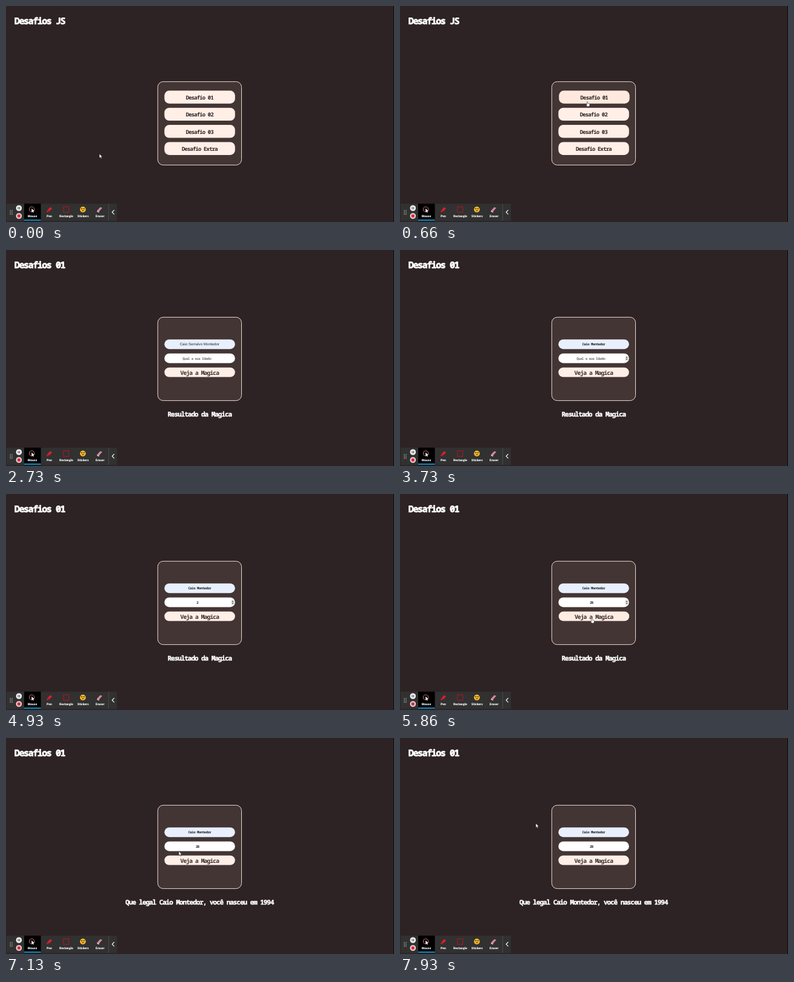
These frames come from a looping animation (640 by 358 pixels, 8 s). An HTML page:

```html
<!DOCTYPE html>
<html lang="pt-BR">
<head>
<meta charset="utf-8">
<title>Desafios JS</title>
<style>
  html, body { margin: 0; width: 100%; height: 100%; overflow: hidden; background: #2d2224; }
  svg { display: block; width: 100%; height: 100%; }
  text { font-family: "Noto Sans Mono", monospace; font-weight: 700; letter-spacing: -.09em; text-rendering: geometricPrecision; stroke-linejoin: round; }
  .mid text { text-anchor: middle; }
  .heading { font-size: 14.8px; font-weight: 900; fill: #fff; stroke: #fff; stroke-width: .8; }
  .result { font-size: 10.9px; font-weight: 800; fill: #fff; stroke: #fff; stroke-width: .4; }
  .card { fill: #433534; stroke: #ecdad4; stroke-width: 1; }
  .menu text { font-size: 8.9px; fill: #2d2224; }
  .action text { font-size: 9.6px; fill: #3a2c2d; }
  .field { font-size: 5.7px; fill: #222; }
  .placeholder { font-weight: 600; fill: #757575; }
  .preview { font: 400 6.2px "Liberation Sans", Arial, sans-serif; letter-spacing: 0; fill: #222; }
  .tools text { font: 900 5px Roboto, sans-serif; letter-spacing: 0; fill: #fff; }
</style>
</head>
<body>
<svg viewBox="0 0 640 358">
  <rect width="640" height="358" fill="#2d2224"/>
  <rect x="639" width="1" height="358" fill="#0c0909"/>
  <text id="heading" class="heading" x="14" y="29.8"></text>

  <g id="menuPage" class="mid">
    <rect class="card" x="250.3" y="125.4" width="138.2" height="138.2" rx="9"/>
  </g>

  <g id="formPage" class="mid">
    <rect class="card" x="250.3" y="111.4" width="138.2" height="138.2" rx="9"/>
    <rect id="nameBox" x="261.3" y="148.2" width="116.5" height="16" rx="8"/>
    <text id="name" x="319.3" y="158.2"></text>
    <rect x="261.3" y="171.4" width="116.5" height="16" rx="8" fill="#fff"/>
    <text id="age" x="315.8" y="181.6"></text>
    <g id="spinner">
      <rect x="371.5" y="175.3" width="5" height="8.4" rx="1" fill="#e6e6e6"/>
      <path d="M372.4 178.8l1.6-2 1.6 2zM372.4 180.6l1.6 2 1.6-2z" fill="#444"/>
    </g>
    <text id="result" class="result" x="319.3" y="275.6"></text>
  </g>

  <g id="tools" class="tools mid">
    <rect x="1" y="327.6" width="182" height="28.8" fill="#313131"/>
    <rect x="30" y="327.6" width="27.5" height="28.8" fill="#000"/>
    <rect x="30" y="354" width="27.5" height="1.7" fill="#17a5ea"/>
    <path d="M7.2 338.2v8M10 338.2v8" stroke="#bbb" stroke-width="1.2" stroke-dasharray="1.2 1"/>
    <circle cx="21.3" cy="335" r="4.8" fill="#f2f2f2"/>
    <path d="M20.1 333v4M22.5 333v4" stroke="#444" stroke-width="1.1"/>
    <circle cx="21.3" cy="348" r="4.8" fill="#ead9db"/>
    <rect x="18.8" y="345.5" width="5" height="5" rx=".8" fill="#d8283a"/>
    <circle cx="42.5" cy="337" r="4.1" fill="none" stroke="#d98086" stroke-width=".9"/>
    <path d="M42.3 335.5v6.5l1.5-1.4 1 2 1-.5-1-2h2z" fill="#fff"/>
    <path d="M67 342l1.2-4 5-4.8 2.8 2.6-5 5z" fill="#d9202c"/>
    <path d="M68.2 338l2.8 2.8" stroke="#7d1018"/>
    <rect x="94.8" y="332.8" width="8.8" height="9.2" fill="none" stroke="#b01424" stroke-width="1.1"/>
    <circle cx="126.8" cy="337.3" r="4.8" fill="#fbc02d"/>
    <path d="M123.6 336h2.6M127.4 336h2.6" stroke="#5b3a12" stroke-width="1.4"/>
    <path d="M124.3 338.6q2.5 3.4 5 0z" fill="#8a3b12"/>
    <path d="M150 339.2l5.4-5.8 3.4 1.2-5.2 6.2z" fill="#d98496"/>
    <path d="M150 339.2l3.6 1.6-.2 1.7-3.2-1.4z" fill="#f0ccd2"/>
    <path d="M169.3 328v28" stroke="#555" stroke-width=".8"/>
    <path d="M178.5 338.2l-3.4 3.6 3.4 3.6" fill="none" stroke="#fff" stroke-width="1.2"/>
  </g>

  <g id="cursor" stroke-linejoin="round">
    <path id="arrow" d="M0 0V7L1.6 5.5 2.8 8.1 4 7.6 2.9 5.1H5z" fill="#fff" stroke="#111" stroke-width=".5"/>
    <path id="hand" d="M-.7 .7Q0-.3.7.7V3.3L3.6 4Q4.2 4.3 4 5.2L3.3 8.6H-.3L-2.2 5.6Q-2.4 4.8-.7 5.6z" fill="#fff" stroke="#222" stroke-width=".5"/>
  </g>
</svg>
<script>
const LOOP = 8000;
const PAGE_SWITCH = 1060;
const PERSON = 'Caio Montedor';
const $ = id => document.getElementById(id);

function add(parent, tag, attrs, content = '') {
  const node = document.createElementNS('http://www.w3.org/2000/svg', tag);
  for (const key in attrs) node.setAttribute(key, attrs[key]);
  node.textContent = content;
  return parent.appendChild(node);
}

function addButton(page, kind, label, y, height, baseline) {
  const group = add(page, 'g', { class: kind });
  const box = add(group, 'rect', { x: 261.3, y, width: 116.5, height, rx: 8 });
  add(group, 'text', { x: 319.3, y: baseline }, label);
  return { group, box };
}

const menu = ['Desafio 01', 'Desafio 02', 'Desafio 03', 'Desafio Extra'].map((label, i) =>
  addButton($('menuPage'), 'menu', label, 140.3 + 28.4 * i, 21.4, 154.8 + 28.4 * i));
const action = addButton($('formPage'), 'action', 'Veja a Magica', 194.7, 15.9, 206.6);

['Mouse', 'Pen', 'Rectangle', 'Stickers', 'Eraser'].forEach((label, i) =>
  add($('tools'), 'text', { x: 43.5 + 27.9 * i, y: 349.5 }, label));

const smooth = (t, from, to) => {
  const k = Math.min(1, Math.max(0, (t - from) / (to - from)));
  return k * k * (3 - 2 * k);
};

// Hovered buttons slide right and turn peach.
function setHover({ group, box }, k) {
  const mix = (a, b) => Math.round(a + (b - a) * k);
  group.setAttribute('transform', `translate(${4.5 * k} 0)`);
  box.setAttribute('fill', `rgb(${mix(255, 244)},${mix(239, 211)},${mix(231, 184)})`);
}

function setText(id, content, className) {
  $(id).textContent = content;
  $(id).setAttribute('class', className);
}

const show = (id, on) => $(id).style.display = on ? '' : 'none';

const path = [ // time, x, y
  [0, 154, 245], [60, 154, 245], [640, 309, 158], [930, 309, 157], [1200, 308.5, 166.5], [1300, 308, 162],
  [5760, 317, 193], [5860, 316.5, 205.5], [6200, 317, 206], [6400, 320, 213.5],
  [6800, 320, 213.5], [7600, 226, 144], [7930, 224, 141.5], [8000, 224, 141.5]
];

function cursorAt(t) {
  const i = path.findIndex(p => p[0] > t);
  const [t0, x0, y0] = path[i - 1], [t1, x1, y1] = path[i];
  const k = smooth(t, t0, t1);
  return [x0 + (x1 - x0) * k, y0 + (y1 - y0) * k];
}

function draw(t) {
  const onForm = t >= PAGE_SWITCH;
  const clicked = t >= 6200;
  show('menuPage', !onForm);
  show('formPage', onForm);
  $('heading').textContent = onForm ? 'Desafios 01' : 'Desafios JS';

  menu.forEach((button, i) => setHover(button, i ? 0 : smooth(t, 580, 860)));
  setHover(action, smooth(t, 5800, 6130) - smooth(t, 6790, 7100));

  $('nameBox').setAttribute('fill', t < 2730 ? '#fff' : '#e8f0fe');
  if (t < 2730) setText('name', 'Digite seu Nome:', 'field placeholder');
  else if (t < 3200) setText('name', 'Caio Serralvo Montedor', 'preview');
  else setText('name', PERSON, 'field');

  if (t < 4930) setText('age', 'Qual a sua Idade:', 'field placeholder');
  else setText('age', t < 5200 ? '2' : '28', 'field');
  show('spinner', t >= 3460 && !clicked);

  $('result').textContent = clicked ? `Que legal ${PERSON}, você nasceu em 1994` : 'Resultado da Magica';

  const pointing = (t >= 560 && t < 1300) || (t >= 5760 && t < 6390);
  show('cursor', t < 1300 || t >= 5760);
  show('hand', pointing);
  show('arrow', !pointing);
  $('cursor').setAttribute('transform', `translate(${cursorAt(t)})`);
}

const start = performance.now();
function tick() {
  draw((performance.now() - start) % LOOP);
  requestAnimationFrame(tick);
}
tick();
</script>
</body>
</html>
```
